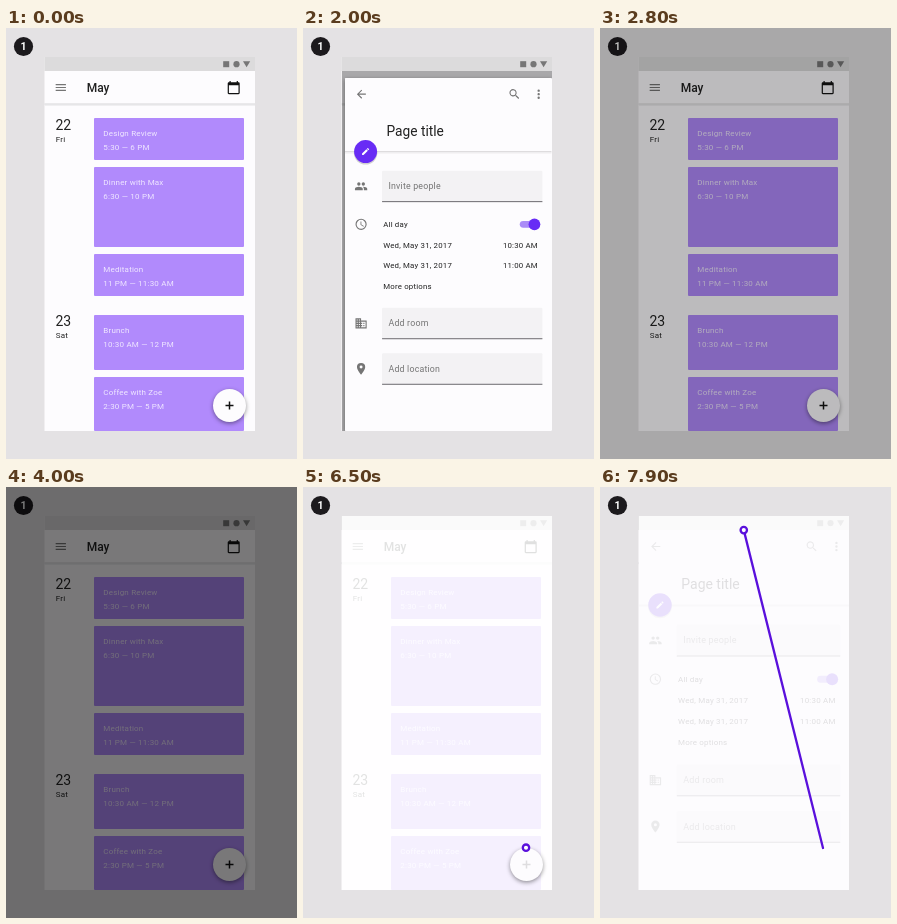
An HTML page that plays this animation: 291 px wide and 431 px high, repeating every 8000 ms.

```html
<!DOCTYPE html>
<html lang="en">
<head>
<meta charset="utf-8">
<title>Container transform</title>
<style>
  html, body { margin: 0; width: 100%; height: 100%; overflow: hidden; background: #e4e2e4; }
  body, div, svg { position: absolute; }
  svg { left: 0; top: 0; overflow: visible; }
  text { font-family: Roboto, Arial, sans-serif; font-size: 8px; letter-spacing: .2px; fill: #212121; }
  .big { font-size: 14px; letter-spacing: 0; }
  .hint { font-size: 9px; fill: #757575; }
  .event { fill: #f0e8ff; }
  .icon { fill: #757575; }
  #scrim, #screen { left: 38.5px; top: 43px; width: 210.5px; height: 360px; }
  #screen { overflow: hidden; }
  #scrim { background: #000; }
  #veil { left: 38.5px; top: 29px; width: 210.5px; height: 374px; background: #fff; }
  #box { overflow: hidden; background: #fdfcfe; box-shadow: 0 1.5px 4px rgba(0, 0, 0, .42); }
  #page, #plus { transform-origin: 0 0; }
  #dim { inset: 0; background: #000; }
</style>
</head>
<body>
<svg id="calendar" width="291" height="431"></svg>
<div id="scrim"></div>
<div id="veil"></div>
<div id="screen">
  <div id="box">
    <svg id="page" width="211" height="360"></svg>
    <svg id="plus" width="1" height="1"><path d="M-4 0H4M0-4V4" stroke="#111" stroke-width="1.5"/></svg>
  </div>
</div>
<div id="dim"></div>
<svg id="trace" width="291" height="431" fill="none" stroke="#5a10dc" stroke-width="2.3" stroke-linecap="round">
  <path id="line"/>
  <circle id="ring" r="3.2" fill="#fff"/>
</svg>
<script>
const $ = id => document.getElementById(id);
const clamp = x => Math.min(1, Math.max(0, x));
const ramp = (t, from, to) => clamp((t - from) / (to - from));
const mix = (a, b, p) => a + (b - a) * p;

const rect = (x, y, w, h, fill, r = 0) =>
  `<rect x="${x}" y="${y}" width="${w}" height="${h}" rx="${r}" fill="${fill}"/>`;
const circle = (x, y, r, fill) => `<circle cx="${x}" cy="${y}" r="${r}" fill="${fill}"/>`;
const text = (x, y, str, cls = '', more = '') => `<text x="${x}" y="${y}" class="${cls}" ${more}>${str}</text>`;
// Icons sit on a 24-unit grid and are placed by their centre.
const icon = (x, y, scale, d, fill = '#757575') =>
  `<path transform="translate(${x} ${y}) scale(${scale}) translate(-12 -12)" fill="${fill}" fill-rule="evenodd" d="${d}"/>`;

const ICONS = {
  today: 'M20 3h-1V1h-2v2H7V1H5v2H4c-1.1 0-2 .9-2 2v16c0 1.1.9 2 2 2h16c1.1 0 2-.9 2-2V5c0-1.1-.9-2-2-2zm0 18H4V8h16z',
  menu: 'M3 18h18v-2H3zM3 13h18v-2H3zM3 6v2h18V6z',
  back: 'M20 11H7.83l5.59-5.59L12 4l-8 8 8 8 1.41-1.41L7.83 13H20z',
  search: 'M15.5 14h-.8l-.3-.3A6.5 6.5 0 1 0 13.7 14.4l.3.3v.8l5 5 1.5-1.5zM9.5 14a4.5 4.5 0 1 1 0-9 4.5 4.5 0 0 1 0 9z',
  more: 'M12 4a2 2 0 1 0 0 4 2 2 0 0 0 0-4zm0 6a2 2 0 1 0 0 4 2 2 0 0 0 0-4zm0 6a2 2 0 1 0 0 4 2 2 0 0 0 0-4z',
  edit: 'M3 17.25V21h3.75L17.8 9.94l-3.75-3.75zM20.7 7.04a1 1 0 0 0 0-1.41l-2.34-2.34a1 1 0 0 0-1.41 0l-1.83 1.83 3.75 3.75z',
  people: 'M16 11a3 3 0 1 0 0-6 3 3 0 0 0 0 6zm-8 0a3 3 0 1 0 0-6 3 3 0 0 0 0 6zm0 2c-2.3 0-7 1.2-7 3.5V19h14v-2.5C15 14.2 10.3 13 8 13zm8 0-1 .05c1.2.85 2 2 2 3.45V19h6v-2.5c0-2.3-4.7-3.5-7-3.5z',
  clock: 'M12 2a10 10 0 1 0 0 20 10 10 0 0 0 0-20zm0 18a8 8 0 1 1 0-16 8 8 0 0 1 0 16zM12.5 7H11v6l5.25 3.15.75-1.23-4.5-2.67z',
  room: 'M12 7V3H2v18h20V7zM6 19H4v-2h2zm0-4H4v-2h2zm0-4H4V9h2zm0-4H4V5h2zm4 12H8v-2h2zm0-4H8v-2h2zm0-4H8V9h2zm0-4H8V5h2zm10 12h-8v-2h2v-2h-2v-2h2v-2h-2V9h8zm-2-8h-2v2h2zm0 4h-2v2h2z',
  place: 'M12 2a7 7 0 0 0-7 7c0 5.25 7 13 7 13s7-7.75 7-13a7 7 0 0 0-7-7zm0 9.5a2.5 2.5 0 1 1 0-5 2.5 2.5 0 0 1 0 5z'
};

const event = (y, h, title, time) =>
  rect(88, y, 150, h, '#b18afc', 1) +
  text(97.3, y + 18.3, title, 'event') + text(97.3, y + 32.3, time, 'event');
const day = (y, number, name) => text(49.5, y, number, 'big') + text(49.8, y + 11.5, name);
const field = (y, hint) =>
  rect(76.3, y, 163.5, 32, '#f3f2f4', 1) + rect(76.3, y + 31, 163.5, 1.1, '#77757a') +
  text(82.8, y + 19, hint, 'hint');

$('calendar').innerHTML =
  circle(17.5, 18.5, 9.6, '#1c1a1d') +
  text(17.6, 22.2, '1', '', 'text-anchor="middle" style="font-size:10.5px;font-weight:700;fill:#fff"') +
  rect(38.5, 29, 210.5, 374, '#fdfcfe') + rect(38.5, 29, 210.5, 14, '#dcdbdc') +
  rect(217.2, 33.2, 6, 6, '#767676') + circle(230.5, 36.2, 3.1, '#767676') +
  '<path d="M237 33.3h7.2l-3.6 6z" fill="#767676"/>' +
  rect(38.5, 75.5, 210.5, 1.2, '#d8d7d9') + rect(38.5, 76.7, 210.5, 1.2, '#efeef0') +
  icon(54.8, 59.5, .57, ICONS.menu) +
  text(80.7, 64.3, 'May', '', 'style="font-size:12px;font-weight:500;letter-spacing:0"') +
  icon(227.7, 59.6, .6, ICONS.today, '#111') +
  day(102, '22', 'Fri') + day(298, '23', 'Sat') +
  event(90, 42, 'Design Review', '5:30 — 6 PM') +
  event(139, 80, 'Dinner with Max', '6:30 — 10 PM') +
  event(226, 42, 'Meditation', '11 PM — 11:30 AM') +
  event(287, 55, 'Brunch', '10:30 AM — 12 PM') +
  event(349, 54, 'Coffee with Zoe', '2:30 PM — 5 PM');

const row = (y, date, time) =>
  text(77.5, y, date) + text(235.2, y, time, '', 'text-anchor="end"');

$('page').innerHTML = '<g transform="translate(-38.5 -43)">' +
  icon(55.2, 59.5, .57, ICONS.back) + icon(211.3, 59.5, .57, ICONS.search) + icon(236, 59.5, .6, ICONS.more) +
  text(80.8, 101.7, 'Page title', 'big') +
  rect(38.5, 117.6, 210.5, 1.2, '#d8d7d9') + rect(38.5, 118.8, 210.5, 1.2, '#efeef0') +
  circle(59.5, 119.3, 12, 'rgba(0,0,0,.18)') + circle(59.5, 118, 11.7, '#682cf5') +
  icon(59.5, 118, .4, ICONS.edit, '#fff') +
  icon(54.9, 153.4, .57, ICONS.people) + field(137.5, 'Invite people') +
  icon(54.9, 192.2, .57, ICONS.clock) + text(77.5, 195, 'All day') +
  rect(216.7, 188.7, 20, 7, '#ab8cf7', 3.5) + circle(231.7, 192.2, 6, '#682cf5') +
  row(216, 'Wed, May 31, 2017', '10:30 AM') + row(237, 'Wed, May 31, 2017', '11:00 AM') +
  text(77.5, 258, 'More options') +
  icon(54.9, 293.2, .57, ICONS.room) + field(277.3, 'Add room') +
  icon(54.9, 339.6, .6, ICONS.place) + field(323.8, 'Add location') + '</g>';

function bezier(x, x1, x2) {
  const at = (s, a, b) => 3 * (1 - s) ** 2 * s * a + 3 * (1 - s) * s * s * b + s ** 3;
  let low = 0, high = 1;
  for (let i = 0; i < 24; i++) {
    const mid = (low + high) / 2;
    if (at(mid, x1, x2) < x) low = mid; else high = mid;
  }
  return at(low, 0, 1);
}

function openness(t) {
  if (t < 1800) return bezier(ramp(t, 330, 1130), .4, .1);
  if (t < 6000) return 1 - bezier(ramp(t, 1838, 2518), 1, .6);
  return bezier(ramp(t, 6840, 7930), .4, .1);
}

function draw(t) {
  const p = openness(t);
  const reveal = ramp(t, 6100, 6500);
  const veil = .87 * reveal;

  // The top centre of the container follows a straight line.
  const cx = mix(223, 143.75, p), top = mix(360.7, 43, p);
  const w = mix(33, 210.5, p), h = mix(33, 360, p);
  Object.assign($('box').style, {
    left: cx - w / 2 - 38.5 + 'px', top: top - 43 + 'px',
    width: w + 'px', height: h + 'px', borderRadius: 16.5 * (1 - p) + 'px'
  });
  $('page').style.transform = `scale(${w / 210.5})`;
  $('page').style.opacity = ramp(p, .15, .6) * (1 - veil);
  $('plus').style.transform = `translate(${w / 2}px, ${h / 2}px) scale(${w / 33})`;
  $('plus').style.opacity = (1 - ramp(p, 0, .25)) * (1 - veil);

  $('scrim').style.opacity = .34 * p;
  $('veil').style.opacity = veil;
  $('dim').style.opacity = .52 * (ramp(t, 2500, 3100) - reveal);

  $('trace').style.opacity = reveal;
  $('line').setAttribute('d', `M223 361L${cx} ${top}`);
  $('ring').setAttribute('cx', cx);
  $('ring').setAttribute('cy', top);
}

const start = performance.now();
function tick() {
  // Motion advances in 100 ms steps.
  draw(Math.floor((performance.now() - start) % 8000 / 100) * 100);
  requestAnimationFrame(tick);
}
tick();
</script>
</body>
</html>
```
